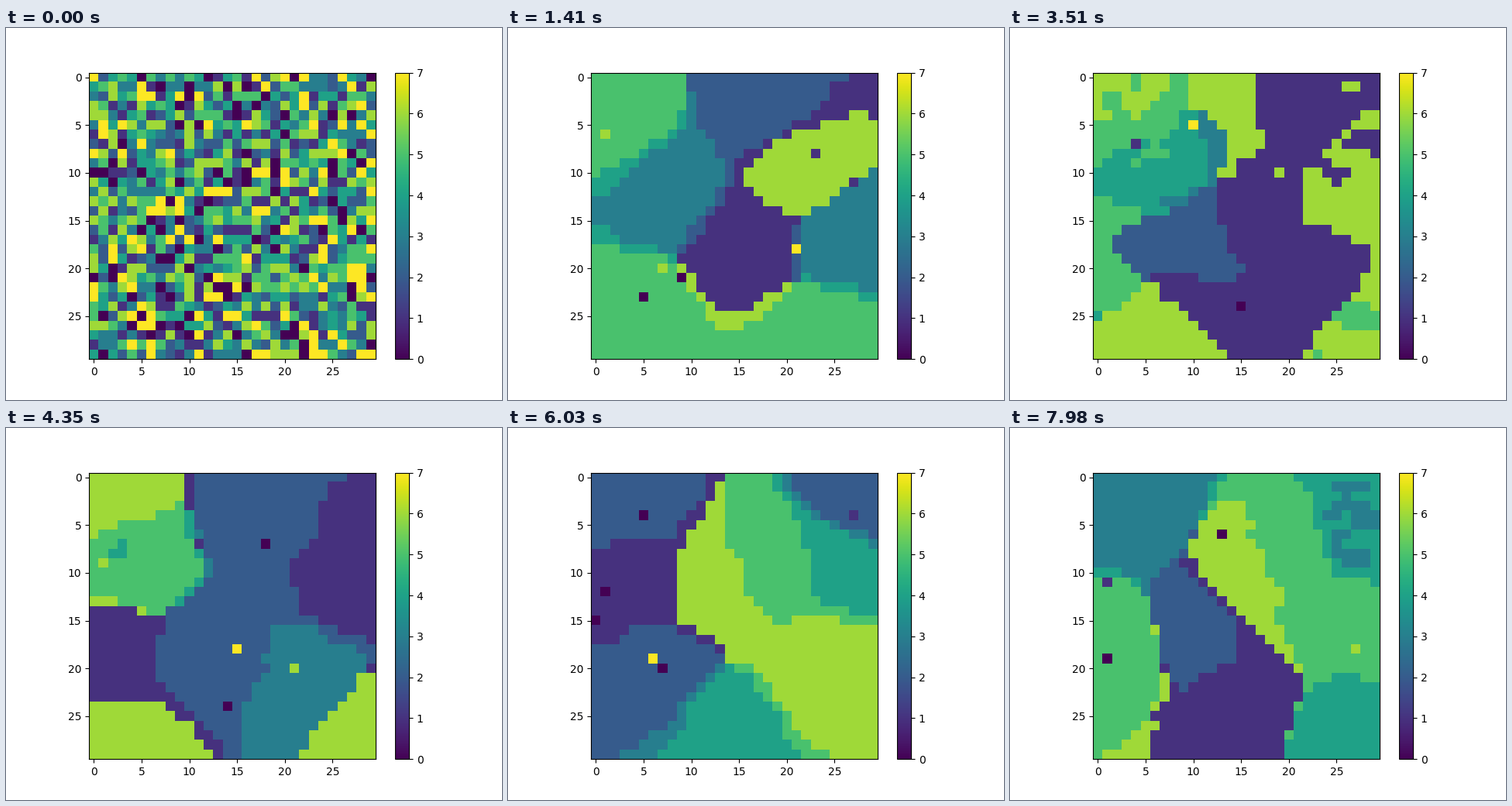
A matplotlib script that plays this animation: 640x480 px, repeating every 8 s.

```python
import numpy as np
import matplotlib.pyplot as plt
from matplotlib.animation import FuncAnimation

N = 30            # cells per side
STATES = 8
CYCLE = 6         # states 1..6 follow one another in a ring, 0 and 7 only flash up
STEPS = 267
LOOP_MS = 8000
SETTLE = 14       # steps of coarsening before the waves take over
SPARK_LIFE = 3

rng = np.random.default_rng(11)
rows, cols = np.mgrid[:N, :N]


def neighbourhood(a):
    return sum(np.roll(a, (i, j), (0, 1)) for i in (-1, 0, 1) for j in (-1, 0, 1))


def coarsen(grid):
    """A random part of the cells takes the commonest state around it."""
    votes = [neighbourhood((grid == k).astype(float)) + rng.random((N, N)) for k in range(STATES)]
    return np.where(rng.random((N, N)) < 0.3, np.argmax(votes, axis=0), grid)


def phase_field(*seeds):
    """Blend seeds (x, y, state) round the ring, each weighted by its nearness."""
    total = 0
    for x, y, state in seeds:
        dist2 = (cols - x) ** 2 + (rows - y) ** 2
        total = total + np.exp(2j * np.pi * state / CYCLE) / (dist2 + 0.5) ** 2.5
    return np.angle(total) * CYCLE / (2 * np.pi)


def to_state(phase):
    return (np.rint(phase + rough).astype(int) - 1) % CYCLE + 1


def advance_to(step, *seeds):
    """Carry every cell from its present phase to the new field by the given step."""
    global phase
    target = phase_field(*seeds)
    # Cells prefer to move up the ring, but may fall back by up to two states.
    turn = (target - phase + 2) % CYCLE - 2
    span = step - len(grids) + 1
    for k in range(1, span + 1):
        grids.append(to_state(phase + turn * k / span))
    phase = target


def add_sparks():
    """Two random cells flip at every step and soon fall back."""
    for step in range(SETTLE, STEPS):
        for _ in range(2):
            x, y = rng.integers(0, N, 2)
            state = rng.choice([0, 0, 1, 6, 7])
            for grid in grids[step:step + SPARK_LIFE]:
                grid[y, x] = state


rough = neighbourhood(rng.normal(0, 0.04, (N, N)))

grids = [rng.integers(0, STATES, (N, N))]
for _ in range(SETTLE):
    grids.append(coarsen(grids[-1]))
phase = np.clip(grids[-1], 1, CYCLE).astype(float)

advance_to(47, (3, 4, 5), (4, 26, 5), (24, 27, 5), (21, 10, 6),
           (16, 17, 1), (17, 3, 2), (8, 11, 3), (26, 17, 3))
advance_to(88, (10, 7, 4), (3, 2, 5), (2, 18, 3), (11, 16, 2),
           (15, 15, 6), (24, 5, 6), (23, 18, 5), (8, 25, 6))
advance_to(145, (2, 1, 6), (5, 9, 4.6), (2, 18, 1), (17, 4, 2), (12, 18, 2),
           (22, 22, 3), (27, 10, 1), (3, 28, 6), (28, 27, 6))
advance_to(201, (3, 3, 2), (4, 11, 1), (12, 12, 6), (19, 9, 5), (25, 8, 4),
           (27, 3, 2), (22, 20, 6), (7, 20, 2), (14, 26, 4))
advance_to(235, (2, 6, 3.5), (2, 22, 3), (7, 15, 2), (12, 20, 1), (13, 9, 6),
           (19, 12, 5), (27, 8, 4), (27, 20, 3), (22, 25, 6))
advance_to(266, (4, 4, 3), (2, 17, 5), (10, 15, 2), (16, 24, 1), (15, 10, 6),
           (20, 8, 5), (27, 6, 3.5), (26, 15, 5), (25, 27, 4))
add_sparks()

fig, ax = plt.subplots(figsize=(6.4, 4.8), dpi=100)
image = ax.imshow(grids[0], cmap="viridis", vmin=0, vmax=STATES - 1, interpolation="nearest")
fig.colorbar(image)


def draw(step):
    image.set_data(grids[step])
    return (image,)


anim = FuncAnimation(fig, draw, frames=STEPS, interval=LOOP_MS / STEPS, repeat=True, repeat_delay=0)
plt.show()
```
